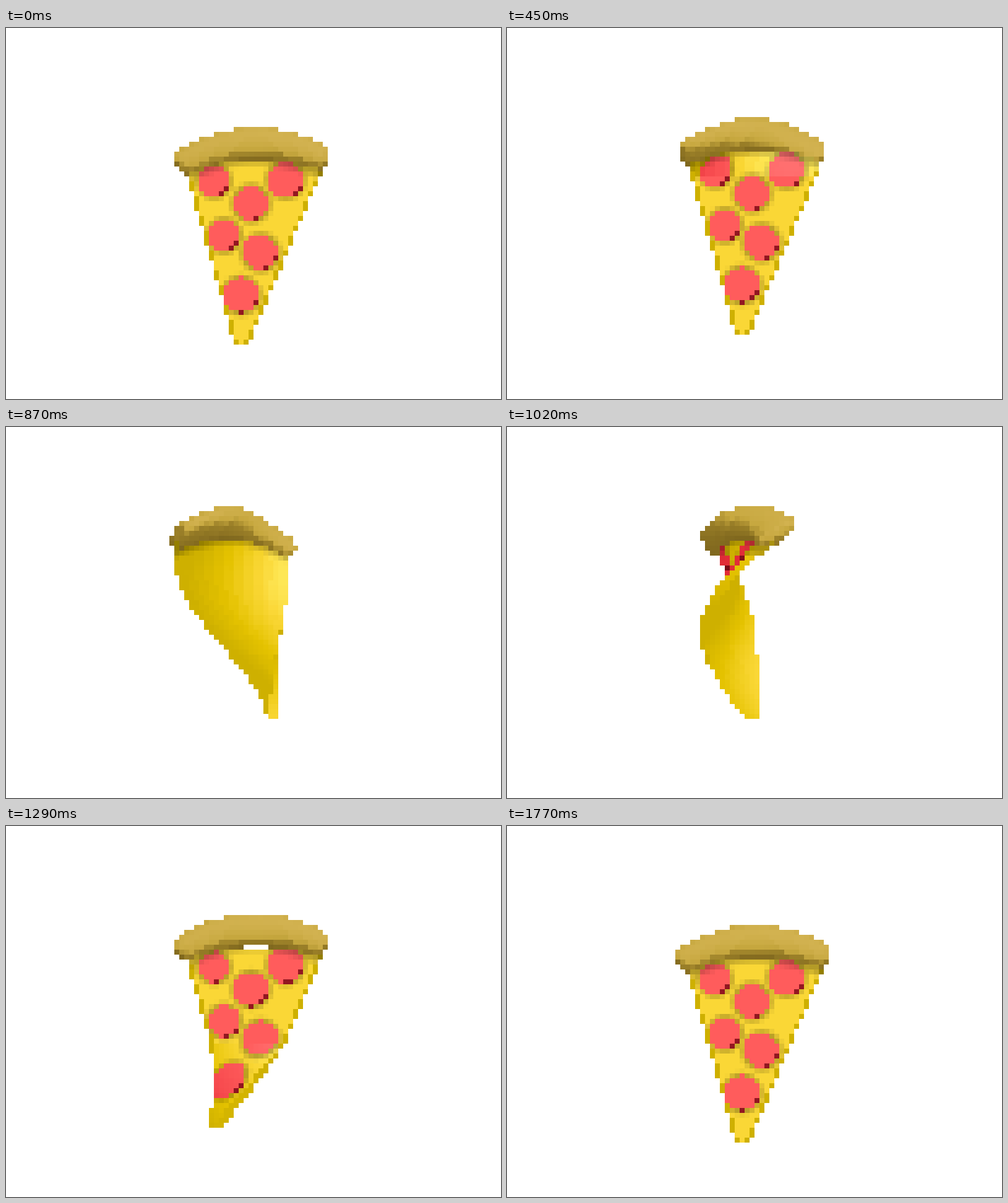
Write an HTML page with a canvas that moves like this. It is 800 px wide and 600 px high and loops after 1800 ms.

```html
<!DOCTYPE html>
<html lang="en">
<head>
<meta charset="utf-8">
<title>Twisting pizza slice</title>
<style>
  html, body { margin: 0; width: 100%; height: 100%; overflow: hidden; background: #fff; }
  canvas { display: block; width: 800px; height: 600px; image-rendering: pixelated; }
</style>
</head>
<body>
<canvas id="stage" width="100" height="75"></canvas>
<script>
const COLS = 100, ROWS = 75, CELL = 8;
const LOOP = 1800, STEP = 30;
const AXIS_X = 384, EYE_Y = 300, EYE_DIST = 2000;
const LIGHT = [0.2, -0.55, 0.81];

const ctx = document.getElementById('stage').getContext('2d');
const image = ctx.createImageData(COLS, ROWS);
const depth = new Float32Array(COLS * ROWS);
const clamp = (v, lo, hi) => Math.min(hi, Math.max(lo, v));

// Colour ramps: [light level, r, g, b]
const CHEESE = [[0.3, 206, 176, 0], [0.6, 228, 194, 0], [0.88, 250, 215, 54], [1, 255, 234, 92]];
const CRUST = [[-0.3, 128, 104, 30], [0.3, 154, 127, 40], [0.55, 198, 167, 62], [1, 210, 178, 80]];
const MEAT = [[0.3, 225, 45, 55], [0.6, 246, 73, 77], [0.88, 255, 92, 92], [1, 255, 112, 112]];
const MEAT_EDGE = [[0, 120, 12, 22], [1, 150, 24, 34]];

function ramp(stops, level) {
  const v = clamp(level, stops[0][0], stops[stops.length - 1][0]);
  let i = 1;
  while (v > stops[i][0]) i++;
  const [a, b] = [stops[i - 1], stops[i]];
  const k = (v - a[0]) / (b[0] - a[0]);
  return [1, 2, 3].map(c => a[c] + (b[c] - a[c]) * k);
}

// Model space: x from the twist axis, y down the stage, z towards the viewer
const sliceZ = y => 8 + 0.14 * (y - 200);
const arcY = x => 188 + 0.0023 * (x - 20) ** 2;

const TOPPINGS = [
  [-47, 248.5, 24.5], [67, 246, 28], [12, 284, 27.5],
  [-31, 335, 25], [27, 362, 27.5], [-4, 429, 27.5]
];

function shadeCheese(level, x, y, front) {
  let color = CHEESE, shadow = 1;
  if (front) {
    for (const [cx, cy, r] of TOPPINGS) {
      const dx = x - cx, dy = y - cy, gap = Math.hypot(dx, dy) - r;
      if (gap < 0) color = gap > -2.5 && dx + dy > r * 0.85 ? MEAT_EDGE : MEAT;
      else if (gap < 9) shadow = Math.min(shadow, 0.74 + 0.26 * gap / 9);
    }
  }
  const belowCrust = y - arcY(x) - 25;
  if (belowCrust < 14) shadow *= 0.72 + 0.02 * Math.max(0, belowCrust);
  return ramp(color, level).map(c => c * shadow);
}

const shadeCrust = level => ramp(CRUST, level);

function makeSurface(rows, cols, point, shade) {
  const grid = [];
  for (let r = 0; r <= rows; r++) {
    grid.push(Array.from({ length: cols + 1 }, (_, c) => point(r / rows, c)));
  }
  return { grid, shade };
}

const FACE = 12;
const slab = makeSurface(48, 2 * FACE + 2, (v, c) => {
  const y = 218 + 288 * v;
  const left = -91 + 0.287 * (y - 240), right = 123 - 0.434 * (y - 240);
  const i = c % (2 * FACE + 2), front = i <= FACE;
  const u = front ? i / FACE : (2 * FACE + 1 - i) / FACE;
  const inset = front ? Math.min(6, (right - left) / 4) : 0;
  const x = left + inset + (right - left - 2 * inset) * u;
  return [x, y, sliceZ(y) + (front ? 9 : -9)];
}, shadeCheese);

const RING = 24;
const crust = makeSurface(48, RING, (v, c) => {
  const u = 2 * v - 1;
  const x = 13 + 122 * u;
  const slope = 0.0046 * (x - 20), len = Math.hypot(1, slope);
  const round = Math.sqrt(Math.max(0, 1 - u ** 24));
  const a = 2 * Math.PI * c / RING;
  const rise = (27 - 5 * u * u) * round * Math.sin(a);
  return [x + rise * slope / len, arcY(x) - rise / len, 8 + (26 - 3 * u * u) * round * Math.cos(a)];
}, shadeCrust);

// The turn starts at the crust and travels down to the tip
function turnAt(y, t) {
  const degrees = 0.487 * (t - 444) - 0.43 * (y - 250);
  return clamp(degrees, 0, 360) * Math.PI / 180;
}

function project([x, y, z], t, lift) {
  const a = turnAt(y, t), cos = Math.cos(a), sin = Math.sin(a);
  const X = x * cos + z * sin, Z = z * cos - x * sin;
  const s = EYE_DIST / (EYE_DIST - Z);
  return {
    x, y, X, Z,
    sx: (AXIS_X + X * s) / CELL - 0.5,
    sy: (EYE_Y + (y - lift - EYE_Y) * s) / CELL - 0.5
  };
}

function lightOn(a, b, c, d) {
  const p = [c.X - a.X, c.y - a.y, c.Z - a.Z];
  const q = [d.X - b.X, d.y - b.y, d.Z - b.Z];
  const n = [p[1] * q[2] - p[2] * q[1], p[2] * q[0] - p[0] * q[2], p[0] * q[1] - p[1] * q[0]];
  const len = Math.hypot(...n) || 1, facing = n[2] < 0 ? -1 : 1;
  return facing * (n[0] * LIGHT[0] + n[1] * LIGHT[1] + n[2] * LIGHT[2]) / len;
}

function fillTriangle(a, b, c, colorAt) {
  const abx = b.sx - a.sx, aby = b.sy - a.sy, acx = c.sx - a.sx, acy = c.sy - a.sy;
  const area = abx * acy - aby * acx;
  if (Math.abs(area) < 1e-9) return;
  const x0 = Math.max(0, Math.ceil(Math.min(a.sx, b.sx, c.sx)));
  const x1 = Math.min(COLS - 1, Math.floor(Math.max(a.sx, b.sx, c.sx)));
  const y0 = Math.max(0, Math.ceil(Math.min(a.sy, b.sy, c.sy)));
  const y1 = Math.min(ROWS - 1, Math.floor(Math.max(a.sy, b.sy, c.sy)));
  for (let py = y0; py <= y1; py++) {
    for (let px = x0; px <= x1; px++) {
      const dx = px - a.sx, dy = py - a.sy;
      const wb = (dx * acy - dy * acx) / area, wc = (abx * dy - aby * dx) / area;
      const wa = 1 - wb - wc;
      if (Math.min(wa, wb, wc) < -1e-6) continue;
      const i = py * COLS + px, z = wa * a.Z + wb * b.Z + wc * c.Z;
      if (z <= depth[i]) continue;
      depth[i] = z;
      const color = colorAt(wa * a.x + wb * b.x + wc * c.x, wa * a.y + wb * b.y + wc * c.y);
      for (let k = 0; k < 3; k++) image.data[4 * i + k] = color[k];
    }
  }
}

function drawSurface({ grid, shade }, t, lift) {
  const pts = grid.map(row => row.map(p => project(p, t, lift)));
  for (let r = 1; r < pts.length; r++) {
    for (let c = 1; c < pts[r].length; c++) {
      const quad = [pts[r - 1][c - 1], pts[r - 1][c], pts[r][c], pts[r][c - 1]];
      const level = lightOn(...quad);
      const colorAt = (x, y) => shade(level, x, y, c <= FACE);
      fillTriangle(quad[0], quad[1], quad[2], colorAt);
      fillTriangle(quad[0], quad[2], quad[3], colorAt);
    }
  }
}

function render(t) {
  const lift = 16 * (1 - Math.cos(2 * Math.PI * t / LOOP));
  image.data.fill(255);
  depth.fill(-1e9);
  drawSurface(slab, t, lift);
  drawSurface(crust, t, lift);
  ctx.putImageData(image, 0, 0);
}

const start = performance.now();
let shown = -1;
function tick() {
  const elapsed = Math.max(0, performance.now() - start) % LOOP;
  const t = Math.floor(elapsed / STEP) * STEP;
  if (t !== shown) render(shown = t);
  requestAnimationFrame(tick);
}
tick();
</script>
</body>
</html>
```
